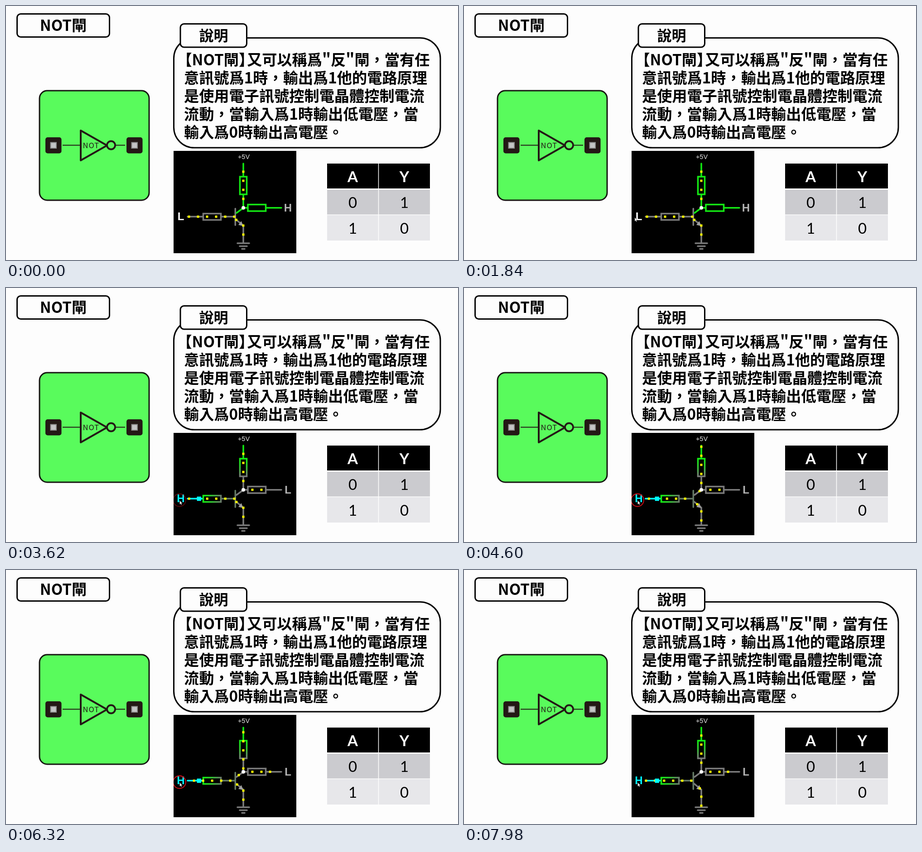
Write an HTML page that moves like this. It is 998 by 561 pixels and loops after 8 s.

```html
<!DOCTYPE html>
<html lang="zh-Hant">
<head>
<meta charset="utf-8">
<title>NOT閘</title>
<style>
  html, body { margin: 0; width: 100%; height: 100%; overflow: hidden; background: #fdfdfd; }
  svg { display: block; width: 100vw; height: 100vh; }
  .cjk { font: 700 33.2px "Noto Sans CJK TC", "Noto Sans CJK JP", "Noto Sans CJK", sans-serif; }
  .table { font: 33px Lato, sans-serif; text-anchor: middle; }
  .gate { font: 16.5px "Noto Sans CJK TC", "Noto Sans CJK JP", sans-serif; letter-spacing: 1px; }
  .logic { font: 700 24px "Liberation Sans", Arial, sans-serif; text-anchor: middle; }
  .mid { text-anchor: middle; }
  .half { font-feature-settings: "halt"; }
  .frame { fill: #fdfdfd; stroke: #000; stroke-width: 3; }
  .wire { fill: none; stroke-width: 3.6; stroke-linecap: round; }
</style>
</head>
<body>
<svg viewBox="0 0 998 561">
  <defs>
    <clipPath id="panel"><rect x="370" y="320" width="271" height="226"/></clipPath>
    <linearGradient id="fadeX" gradientUnits="userSpaceOnUse" x1="434" y1="0" x2="475" y2="0">
      <stop stop-color="#12f012"/><stop offset=".45" stop-color="#2ecb2e"/><stop offset="1" stop-color="#6b7a6b"/>
    </linearGradient>
    <linearGradient id="fadeY" gradientUnits="userSpaceOnUse" x1="0" y1="376" x2="0" y2="416">
      <stop stop-color="#12f012"/><stop offset=".45" stop-color="#2ecb2e"/><stop offset="1" stop-color="#7a7a7a"/>
    </linearGradient>
  </defs>

  <rect class="frame" x="24.5" y="17.5" width="204" height="51" rx="8"/>
  <text class="cjk mid" x="126.5" y="54.5">NOT閘</text>

  <rect class="frame" x="370.5" y="70.5" width="588.5" height="242.5" rx="45"/>
  <rect class="frame" x="385" y="39.5" width="146.5" height="51.5" rx="8"/>
  <text class="cjk mid" x="458.5" y="77" style="font-size:32px">說明</text>
  <g class="cjk">
    <text class="half" x="394" y="131">【NOT閘】</text>
    <text x="532" y="131">又可以稱爲"反"閘，當有任</text>
    <text x="393" y="171">意訊號爲1時，輸出爲1他的電路原理</text>
    <text x="393" y="211">是使用電子訊號控制電晶體控制電流</text>
    <text x="393" y="251">流動，當輸入爲1時輸出低電壓，當</text>
    <text x="393" y="291">輸入爲0時輸出高電壓。</text>
  </g>

  <rect x="74" y="187" width="242" height="242" rx="17" fill="#59fb5c" stroke="#14140f" stroke-width="3"/>
  <g fill="none" stroke="#231815">
    <path d="M125 307.5H164M242 307.5H263" stroke-width="2.2"/>
    <path d="M165 275V341L223 308Z" stroke-width="4" stroke-linejoin="round"/>
    <circle cx="232" cy="307.5" r="9" stroke-width="3.8"/>
  </g>
  <g fill="#231815">
    <rect x="87" y="290" width="35.5" height="35.5" rx="5"/>
    <rect x="266" y="290" width="35.5" height="35.5" rx="5"/>
    <text class="gate" x="169.5" y="313.5">NOT</text>
  </g>
  <g fill="#c4c4c5" stroke="#8b8b8b" stroke-width="2">
    <rect x="98.5" y="301.5" width="12.5" height="12.5"/>
    <rect x="277.5" y="301.5" width="12.5" height="12.5"/>
  </g>

  <g class="table">
    <rect x="709" y="348" width="227" height="55" fill="#000"/>
    <rect x="709" y="406" width="227" height="54.5" fill="#cbcbcf"/>
    <rect x="709" y="462" width="227" height="56" fill="#e7e7ea"/>
    <path d="M822.5 348V518" stroke="#fdfdfd" stroke-width="1.5"/>
    <g fill="#fff" font-weight="700"><text x="765.5" y="388.5">A</text><text x="879.5" y="388.5">Y</text></g>
    <text x="765.5" y="446">0</text><text x="879.5" y="446">1</text>
    <text x="765.5" y="503">1</text><text x="879.5" y="503">0</text>
  </g>

  <g clip-path="url(#panel)">
    <rect x="370" y="320" width="271" height="226" fill="#000"/>
    <text x="525" y="338" fill="#e4e4e4" class="mid" font-size="14.5" font-family="Liberation Sans, Arial, sans-serif">+5V</text>
    <g class="wire">
      <path d="M508 472L524 485V524M511 524H537M516 530.5H532M521 536.5H527" stroke="#7a7a7a"/>
      <path d="M524 486L513 483.5L519.5 475Z" fill="#a0a0a0" stroke="none"/>
      <path id="inputWire" d="M401 465.3H434"/>
      <path id="inputBox" d="M435.5 458.5H474.5V472.5H435.5Z"/>
      <path id="baseWire" d="M476 465.3H505M506.3 447.5V484"/>
      <path d="M524 348V376" stroke="#10e810"/>
      <path id="supplyBox" d="M516.5 377H531.5V416H516.5Z"/>
      <path id="collector" d="M524 417V446L509 457"/>
      <path id="output" d="M524 445.7H533M534 438.5H573.5V453H534ZM575 445.7H608"/>
    </g>
    <g id="dots" fill="#ff0"></g>
    <rect id="knob" x="421.5" y="460.7" width="9.5" height="9.5" fill="#0ff"/>
    <circle cx="524" cy="445.7" r="4" fill="#fff"/>
    <text class="logic" id="inputLabel" x="386" y="472.5"></text>
    <text class="logic" id="outputLabel" x="622.5" y="453.5" fill="#b4b4b4"></text>
    <circle id="click" cx="383" cy="468.5" r="14" fill="none" stroke="#d8101c" stroke-width="1.8"/>
    <path id="cursor" d="M0 0V8.5L2 6.8L3.4 9.8L4.8 9.1L3.4 6.2H6Z" fill="#fff" stroke="#222" stroke-width=".5"/>
  </g>
</svg>
<script>
const LOOP = 8000, SWITCH = 3560, SPACING = 20;
const GREEN = '#14e814', GREY = '#7a7a7a', CYAN = '#00f4ff';
const $ = id => document.getElementById(id);
const svgNode = name => document.createElementNS('http://www.w3.org/2000/svg', name);
const clamp = v => Math.max(0, Math.min(1, v));

// Current paths: starting phase in px, speed in px/s once the input is high
const currents = [
  ['M400 465.3H505', 4, 4.05],
  ['M524 348V446L508 457', 18, 4.45],
  ['M508 472L524 485V522', 0.5, 8.1]
].map(([d, phase, speed]) => {
  const path = svgNode('path');
  path.setAttribute('d', d);
  return { path, phase, speed, length: path.getTotalLength() };
});

const dots = Array.from({ length: 24 }, () => {
  const dot = svgNode('rect');
  dot.setAttribute('width', 5);
  dot.setAttribute('height', 5);
  return $('dots').appendChild(dot);
});

function drawDots(t, high) {
  const points = [];
  const elapsed = Math.max(0, t - SWITCH) / 1000;
  for (const { path, phase, speed, length } of currents) {
    for (let s = (phase + speed * elapsed) % SPACING; s <= length; s += SPACING) {
      points.push(path.getPointAtLength(s));
    }
  }
  if (high) {
    const outputDots = t > 5400 ? [544, 564, 583] : [544, 564];
    for (const x of outputDots) points.push({ x, y: 445.7 });
  }
  dots.forEach((dot, i) => {
    const p = points[i];
    dot.setAttribute('visibility', p ? 'visible' : 'hidden');
    if (!p) return;
    dot.setAttribute('x', p.x - 2.5);
    dot.setAttribute('y', p.y - 2.5);
  });
}

const cursorKeys = [[0, 352, 467], [960, 365.5, 467], [1840, 377, 467], [2700, 383.5, 469.5], [LOOP, 383.5, 469.5]];

function moveCursor(t) {
  const i = cursorKeys.findIndex(key => key[0] > t);
  const [t0, x0, y0] = cursorKeys[i - 1], [t1, x1, y1] = cursorKeys[i];
  const k = (t - t0) / (t1 - t0);
  $('cursor').setAttribute('transform', `translate(${x0 + (x1 - x0) * k} ${y0 + (y1 - y0) * k})`);
}

function render(t) {
  const high = t >= SWITCH;
  const stroke = (id, low, on) => $(id).setAttribute('stroke', high ? on : low);
  stroke('inputWire', GREY, CYAN);
  stroke('inputBox', GREY, 'url(#fadeX)');
  stroke('baseWire', GREY, '#637863');
  stroke('supplyBox', GREEN, 'url(#fadeY)');
  stroke('collector', GREEN, GREY);
  stroke('output', GREEN, GREY);
  $('knob').setAttribute('visibility', high ? 'visible' : 'hidden');
  $('inputLabel').textContent = high ? 'H' : 'L';
  $('inputLabel').setAttribute('fill', high ? CYAN : '#fff');
  $('outputLabel').textContent = high ? 'L' : 'H';
  $('click').setAttribute('opacity', clamp((t - 3530) / 220) * clamp((7450 - t) / 250));
  drawDots(t, high);
  moveCursor(t);
}

function tick() {
  render(performance.now() % LOOP);
  requestAnimationFrame(tick);
}
tick();
</script>
</body>
</html>
```
